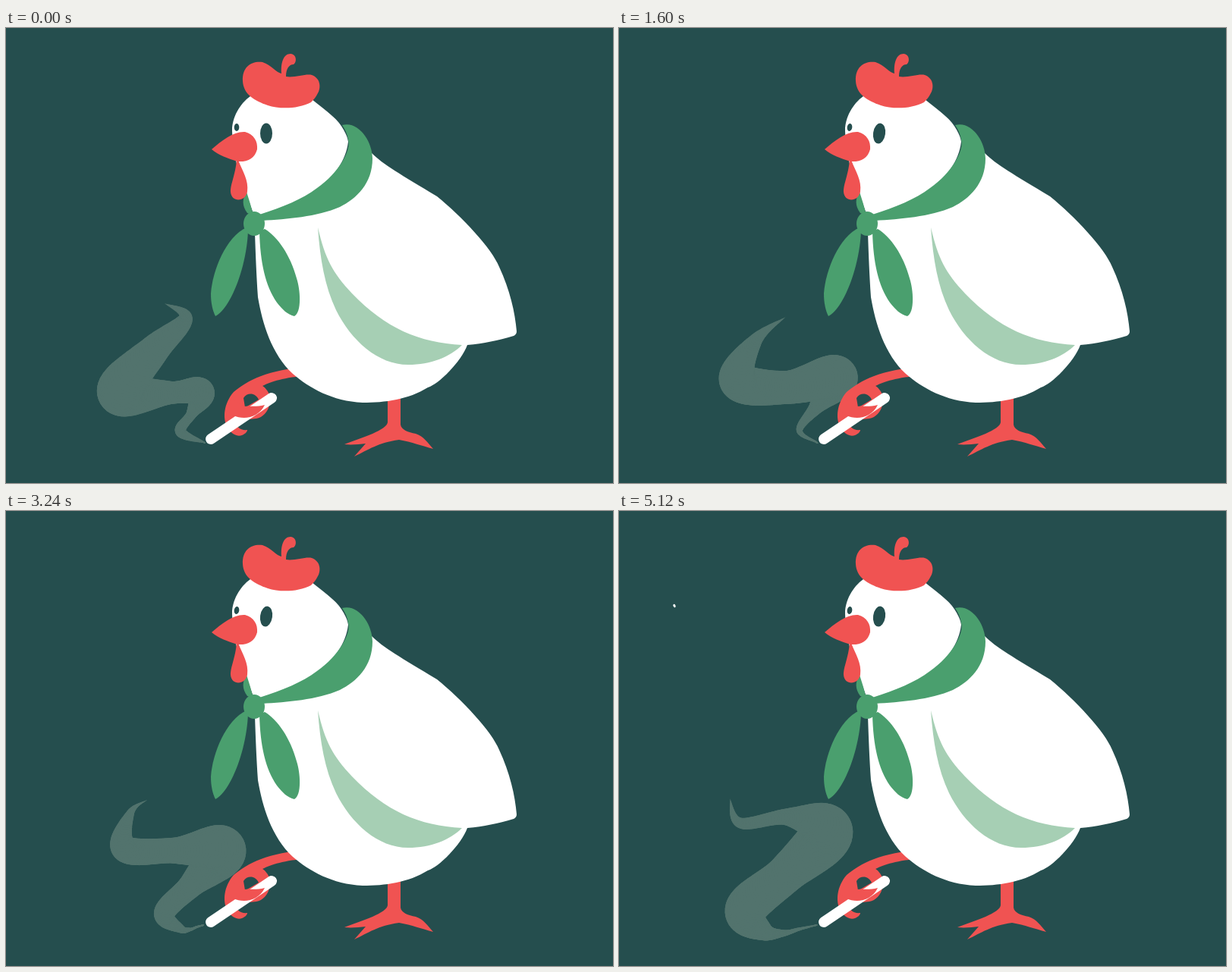
An HTML page with a canvas for the animation above (5.16 s loop, 800 by 600 pixels).

```html
<!DOCTYPE html>
<html lang="en">
<head>
<meta charset="utf-8">
<title>Oui</title>
<style>
html, body { margin: 0; width: 100%; height: 100%; overflow: hidden; background: #254e4e; }
canvas { display: block; }
</style>
</head>
<body>
<canvas id="stage" width="800" height="600"></canvas>
<script>
const LOOP = 5160;
const BG = '#254e4e', RED = '#f05352', GREEN = '#4a9f6e', MINT = '#a6cfb4', SMOKE = '#52736d', WHITE = '#fff';
const ctx = document.getElementById('stage').getContext('2d');

const lerp = (a, b, k) => a + (b - a) * k;
const clamp = v => Math.max(0, Math.min(1, v));
const smooth = v => v * v * (3 - 2 * v);
const linear = v => v;

// Value at time t from [time, value] keys.
function tween(t, keys, ease = smooth) {
  let i = 0;
  while (i < keys.length - 2 && t >= keys[i + 1][0]) i++;
  const [t0, a] = keys[i], [t1, b] = keys[i + 1];
  return lerp(a, b, ease(clamp((t - t0) / (t1 - t0))));
}

// Blend two paths of equal structure.
function mix([a, b], k) {
  const to = b.match(/\d+/g);
  let i = 0;
  return new Path2D(a.replace(/\d+/g, v => lerp(+v, +to[i++], k).toFixed(2)));
}

function fill(path, color) {
  ctx.fillStyle = color;
  ctx.fill(typeof path === 'string' ? new Path2D(path) : path);
}

function ellipse(x, y, rx, ry, color, turn = 0) {
  ctx.fillStyle = color;
  ctx.beginPath();
  ctx.ellipse(x, y, rx, ry, turn, 0, 7);
  ctx.fill();
}

function stroke(path, width, color) {
  ctx.lineWidth = width;
  ctx.strokeStyle = color;
  ctx.lineCap = ctx.lineJoin = 'round';
  ctx.stroke(new Path2D(path));
}

function group(draw) {
  ctx.save();
  draw();
  ctx.restore();
}

// Each pair: upright pose, bent pose.
const body = [
  'M330,240 L482,165 C497,180 520,193 568,222 C600,248 640,290 650,315 C664,345 671,375 673,400 Q673,404 669,406 C648,412 630,416 608,418 C600,440 570,470 556,474 C530,490 500,494 470,494 C430,492 400,475 378,456 C350,430 338,390 332,355 C330,325 329,300 328,270Z',
  'M328,270 L471,172 C490,185 510,195 550,206 C590,220 625,240 645,254 C665,272 680,295 693,320 Q693,324 691,327 C672,350 650,368 624,377 C617,410 590,440 580,450 C550,475 510,494 478,495 C430,493 390,468 365,435 C348,412 342,395 337,375 C335,345 333,320 325,290Z'];
const wing = [
  'M411,263 C421,305 430,322 456,350 C500,396 545,415 601,418 C585,434 560,444 530,444 C490,444 455,412 435,372 C420,340 414,305 411,263Z',
  'M407,301 C420,320 436,337 460,351 C505,375 560,392 620,379 C605,396 580,414 545,414 C505,414 472,383 450,364 C430,342 420,325 407,301Z'];
const skull = [
  'M322,90 C308,100 298,118 298,135 C298,165 308,195 317,220 L328,250 C390,235 445,200 451,150 C450,142 443,127 430,116 C422,109 412,101 403,94 C380,70 340,75 322,90Z',
  'M244,183 C243,203 253,222 266,240 C276,250 288,258 300,266 L322,272 C380,250 428,205 425,165 C421,148 402,140 375,129 C342,118 310,115 279,131 C262,140 246,160 244,183Z'];
const scarf = [
  'M443,128 C465,122 483,150 483,172 C483,205 462,225 440,236 C410,249 370,252 338,254 L334,246 C365,236 390,226 410,211 C440,190 455,160 451,148 C450,140 447,134 443,128Z',
  'M410,141 C440,124 471,145 471,177 C468,210 448,235 422,248 C400,260 370,268 342,274 L330,266 C352,255 375,240 393,224 C416,204 427,184 425,163 C423,150 418,146 410,141Z'];
const fold = [
  'M317,216 C311,225 311,235 318,244 L326,247 L322,232Z',
  'M312,262 C308,266 308,270 312,276 L322,278 L320,266Z'];
const leafLeft = [
  'M317,263 C290,275 272,320 270,350 C270,362 272,372 276,380 C298,368 318,310 319,266Z',
  'M309,288 C300,315 302,335 305,350 C311,375 322,395 332,407 C344,380 342,325 320,288Z'];
const leafRight = [
  'M334,268 C335,310 342,340 357,362 C364,371 371,378 380,380 C390,375 388,345 383,330 C375,300 358,275 341,265Z',
  'M336,284 C342,305 358,330 377,345 C390,357 408,368 424,366 C427,350 415,330 402,312 C390,290 365,275 343,272Z'];
const wattle = [
  'M304,174 C302,195 296,205 296,216 C297,230 315,230 318,216 C320,200 312,190 306,174Z',
  'M304,236 C302,255 295,268 295,281 C297,299 316,299 319,284 C320,268 309,255 306,236Z'];

// Each pair: resting, nudged.
const beret = [
  'M312,70 C311,50 325,43 338,45 C350,49 355,58 363,60 C362,45 366,34 375,34 C384,35 383,46 379,48 C373,48 369,54 369,64 C380,66 395,60 403,62 C414,66 415,77 412,84 C408,92 405,95 402,98 C385,107 360,107 345,102 C328,96 313,88 312,70Z',
  'M307,70 C306,52 318,46 330,48 C345,52 352,58 361,61 C360,48 368,38 378,38 C386,39 388,45 384,50 C378,55 371,56 370,63 C378,60 388,52 396,54 C409,58 412,72 408,82 C405,90 402,93 398,96 C385,106 360,107 345,102 C325,95 309,88 307,70Z'];
const beak = [
  'M271,160 C285,148 300,136 315,137 C327,140 332,150 331,160 C328,172 318,177 305,176 C293,172 280,168 271,160Z',
  'M274,171 C282,158 298,136 315,137 C327,140 332,150 331,160 C328,172 318,177 305,175 C293,174 284,174 274,171Z'];
const openBeak = 'M271,161 C285,148 300,136 315,137 C327,140 332,150 331,160 C328,172 318,177 305,176 C293,174 280,174 273,169 L281,166 L273,164Z';

// Smoke: crests and the bends between them rise as their age grows; values are x, y, half width.
const AGES = [-.45, 0, .18, .38, .55, 1, 1.18, 1.38, 1.55, 2, 2.18, 2.38];
const BASE = [260, 546, 1];
const END = [143, 380, 0, 151, 378, 0, 209, 363, 0];
const tracks = [
  [257, 547, 1, 255, 547, 1, 230, 532, 7, 238, 530, 4, 170, 530, 26, 162, 518, 28, 150, 480, 30, 157, 465, 25, 155, 419, 7, 168, 400, 7, 209, 363, 0],
  [240, 552, 2, 235, 550, 2, 245, 508, 7, 262, 497, 10, 225, 484, 25, 215, 468, 26, 195, 425, 20, 180, 412, 9, ...END],
  [218, 560, 4, 212, 552, 5, 256, 480, 18, 286, 460, 28, 283, 430, 36, 262, 412, 30, 237, 383, 9, 220, 381, 0, ...END],
  [190, 557, 11, 190, 549, 13, 215, 481, 15, 222, 474, 22, 225, 413, 11, 222, 389, 13, 209, 363, 0, 220, 381, 0, ...END]
].map(list => [...BASE, ...list]);

const nodeAt = (track, age) =>
  [0, 1, 2].map(c => tween(age, AGES.map((a, i) => [a, track[3 * i + c]]), linear));

const spline = (a, b, c, d, u) =>
  b + u * (c - a + u * (2 * a - 5 * b + 4 * c - d + u * (3 * (b - c) + d - a))) / 2;

function drawSmoke(t) {
  const from = tween(t, [[1680, 0], [2320, 1], [2800, 1], [2801, 0]]);
  const to = tween(t, [[2800, 1], [2801, 0], [3360, 1]]);
  if (from >= 1 || to <= 0) return;
  const phase = tween(t, [[0, .38], [600, 1], [1600, 1.55], [3840, 3.18], [4600, 3.5], [5120, 4.07], [5160, 4.11]], linear) % 1;
  const nodes = [BASE];
  for (let i = -1; i < 3; i++) for (const track of tracks) nodes.push(nodeAt(track, phase + i));
  const last = nodes.length - 1, steps = last * 22;
  const at = i => nodes[Math.max(0, Math.min(last, i))];
  ctx.strokeStyle = SMOKE;
  ctx.lineCap = 'round';
  let px = BASE[0], py = BASE[1];
  for (let s = 0; s <= steps; s++) {
    const f = s / steps, i = Math.floor(f * last), u = f * last - i;
    const [x, y, w] = [0, 1, 2].map(c => spline(at(i - 1)[c], at(i)[c], at(i + 1)[c], at(i + 2)[c], u));
    const taper = (from > 0 ? clamp((f - from) * 4) : 1) * (to < 1 ? clamp((to - f) * 4) : 1);
    if (w * taper > .1) {
      ctx.lineWidth = 2 * w * taper;
      ctx.beginPath();
      ctx.moveTo(px, py);
      ctx.lineTo(x, y);
      ctx.stroke();
    }
    px = x;
    py = y;
  }
}

function drawFoot(k) {
  ctx.translate(lerp(310, 257, k), lerp(515, 441, k));
  ctx.rotate(.47 * k);
  ctx.translate(-310, -515);
  fill('M400,447 C345,450 318,465 300,480 C287,495 285,515 292,527 C298,537 306,539 311,537 C316,535 318,532 318,530 C309,531 303,526 302,518 L330,515 C338,514 346,505 347,497 L349,488 C346,478 340,473 338,472 C350,466 365,461 400,458Z', RED);
  fill('M313,488 C318,480 329,481 333,490 C326,494 320,498 315,500Z', BG);
  stroke('M270,542 L350,488', 14, WHITE);
  fill('M289,503 C300,517 330,520 341,497 C330,500 322,498 314,499 L300,490Z', RED);
}

function drawHead(t, k, nudge) {
  ctx.translate(lerp(340.3, 277, k), lerp(123.3, 182.7, k));
  ctx.rotate(-1.08 * k);
  ctx.translate(-340.3, -123.3);
  fill(mix(beret, nudge), RED);
  if (t > 3560 && t < 4360) {
    stroke('M335,146 C335,132 348,132 348,146', 4.5, BG);
    stroke('M300,133 C301,128 307,128 308,133', 2.5, BG);
  } else {
    const turn = (t > 1200 ? .14 : 0) + .3 * clamp(k);
    ellipse(343, 139, 8, 13.5, BG, turn);
    ellipse(304, 131, 3.3, 5, BG, turn);
  }
  fill(t > 3520 && t < 3960 ? openBeak : mix(beak, nudge), RED);
}

// Letters are drawn around their own centre.
const letters = [
  { x: 123, start: 3520, path: 'M4,-27 C22,-24 17,10 4,22 C-8,33 -21,24 -17,6 C-14,-12 -7,-28 4,-27Z' },
  { x: 178, start: 3705, path: 'M-8,-26 C-14,0 -20,24 -8,28 C6,28 13,0 17,-30 L11,22' },
  { x: 220, start: 3776, path: 'M5,-31 L-7,23' }
];

function drawWord(t) {
  const thin = 1 - smooth(clamp((t - 4720) / 400));
  for (const { x, start, path } of letters) {
    const age = (t - start) / 390;
    if (age <= 0 || thin <= 0) continue;
    const size = clamp(age * 1.25);
    group(() => {
      ctx.translate(lerp(268, x - .07 * (t - 4600), clamp(age)), 145);
      ctx.scale(size, size);
      stroke(path, 18 * thin, WHITE);
    });
  }
  if (t > 4900) ellipse(73, 125, 1.5, 2.2, WHITE, -.5);
}

function draw(t) {
  const bend = tween(t, [[1600, 0], [1700, -.11], [1960, 1.14], [2600, 1.14], [2680, 1], [2800, -.08], [2880, -.12], [3200, 0]]);
  const nudge = tween(t, [[300, 0], [520, 1], [720, 1], [1000, 0]]);
  ctx.fillStyle = BG;
  ctx.fillRect(0, 0, 800, 600);
  drawSmoke(t);
  group(() => drawFoot(bend));
  fill('M503,484 L503,520 C502,530 470,540 446,549 C455,550 465,549 474,548 L459,565 C478,556 490,547 518,543 C535,546 548,551 563,555 C556,547 550,538 540,535 C530,533 521,530 520,523 L520,484Z', RED);
  group(() => {
    // Leaning back stretches the bird sideways.
    ctx.translate(500, 0);
    ctx.scale(1 - .5 * Math.min(0, bend), 1);
    ctx.translate(-500, 0);
    fill(mix(body, bend), WHITE);
    fill(mix(wing, bend), MINT);
    fill(mix(skull, bend), WHITE);
    for (const part of [fold, scarf, leafLeft, leafRight]) fill(mix(part, bend), GREEN);
    ellipse(lerp(327, 324, bend), lerp(258, 277, bend), 14, 16, GREEN);
    fill(mix(wattle, bend), RED);
    group(() => drawHead(t, bend, nudge));
  });
  drawWord(t);
}

const began = performance.now();
function frame() {
  draw((performance.now() - began) % LOOP);
  requestAnimationFrame(frame);
}
frame();
</script>
</body>
</html>
```
